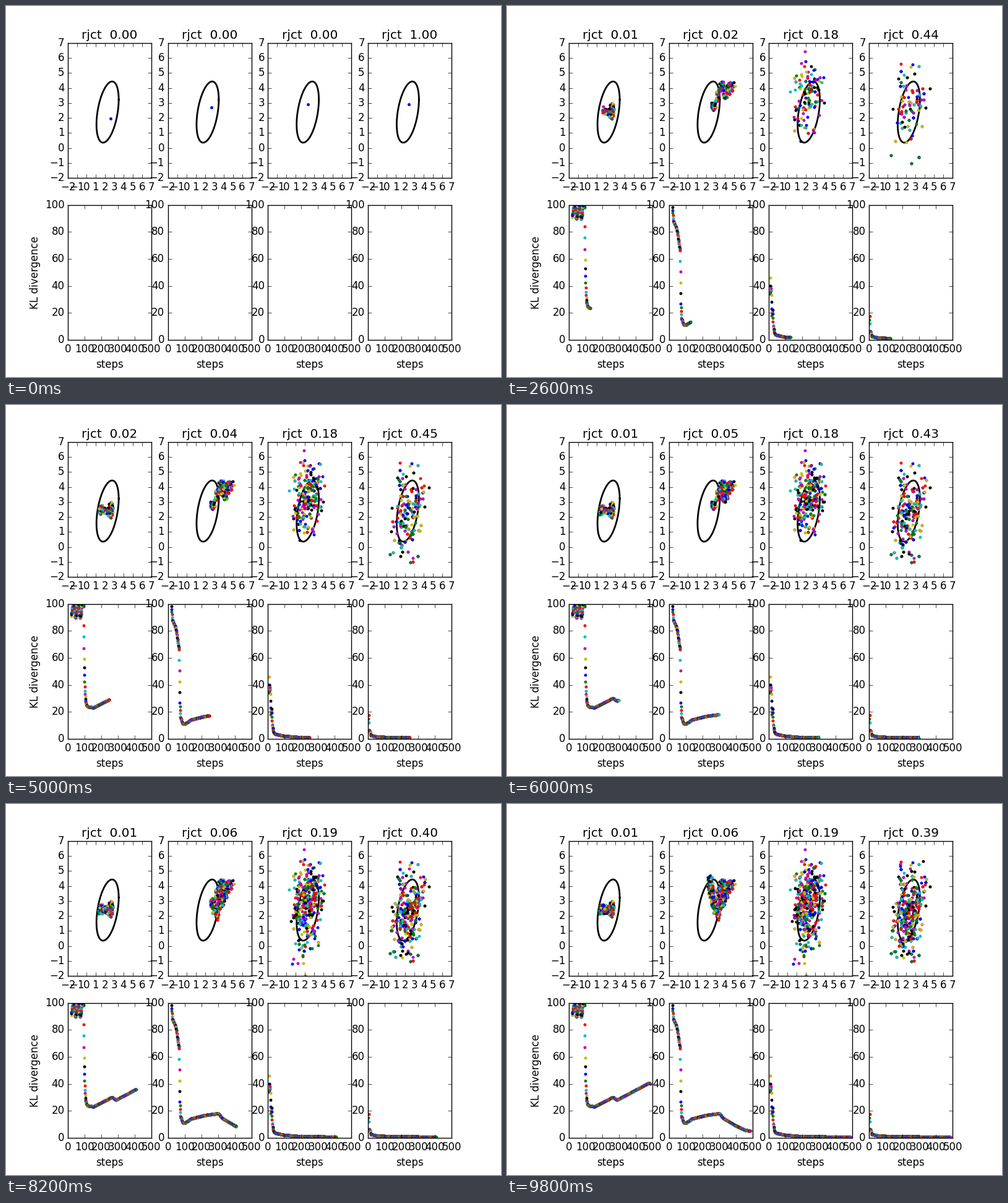
These frames come from a looping animation (800 px wide and 600 px high, 10 s). A matplotlib script:

```python
import numpy as np
import matplotlib.pyplot as plt
from matplotlib.animation import FuncAnimation

plt.style.use("classic")
plt.rcParams["font.family"] = "DejaVu Sans"

FRAMES, INTERVAL, PER_FRAME = 50, 200, 10
STEPS = (FRAMES - 1) * PER_FRAME + 1
HIDDEN = 200    # above the top of the divergence axes
PALETTE = np.array([(0, 0, 1), (0, .5, 0), (1, 0, 0), (0, .75, .75),
                    (.75, 0, .75), (.75, .75, 0), (0, 0, 0)])
n = np.arange(STEPS)


def rejections(*totals):
    """Running count of rejected proposals."""
    stages = [0, 80, 180, 250, 350, 410, 490]
    return np.floor(np.interp(n, stages, totals) + 1e-6).astype(int)


def walk(seed, spread, tilt, rejected, *route):
    """Scatter around a drifting centre, resting on every rejected step."""
    steps, x, y = np.transpose(route)
    rng = np.random.default_rng(seed)
    noise = np.clip(rng.normal(size=(STEPS, 2)), -2, 2)
    noise[0] = 0
    noise[:, 0] = tilt * noise[:, 1] + np.sqrt(1 - tilt ** 2) * noise[:, 0]
    points = np.column_stack([np.interp(n, steps, x), np.interp(n, steps, y)])
    points += noise * spread
    moved = np.diff(rejected, prepend=rejected[0]) == 0
    return points[np.maximum.accumulate(np.where(moved, n, 0))]


def curve(*knots):
    return np.interp(n, *np.transpose(knots), left=HIDDEN)


def slow_start():
    """A waving plateau, a steep fall and a slow climb."""
    plateau = 95.5 + 6 * np.cos(2 * np.pi * (n - 33) / 28.5)
    fall = 60 * np.exp(-(np.maximum(n - 96, 0) / 5.2) ** 1.15)
    climb = curve((96, 24), (155, 23), (265, 30), (290, 28), (345, 31.5),
                  (480, 40.5), (490, 40))
    return np.where(n < 22, HIDDEN, np.where(n < 96, plateau, climb + fall))


rejected = [rejections(0, 0, 2, 4, 5, 5, 6),
            rejections(0, 1, 5, 10, 20, 24, 29),
            rejections(0, 16, 33, 45, 66, 78, 93),
            rejections(1, 31, 85, 113, 144, 164, 191)]

paths = [
    walk(3, (.09, .13), 0, rejected[0],
         (0, 2.6, 1.95), (20, 2.68, 2.85), (40, 2.7, 2.25), (80, 2.65, 2.8),
         (93, 2.75, 2.4), (125, 1.65, 2.5), (300, 1.5, 2.4), (350, 2.5, 2.4),
         (490, 1.8, 2.45)),
    walk(5, (.13, .16), 0, rejected[1],
         (0, 2.7, 2.71), (25, 2.95, 2.9), (62, 3.75, 4.4), (80, 4, 3.4),
         (110, 4.9, 4.15), (140, 4.1, 4.1), (170, 4.3, 3.4), (240, 3.5, 3.8),
         (280, 4.2, 3.3), (350, 3.2, 2.4), (375, 3.35, 1.85),
         (410, 2.6, 3.1), (440, 2.4, 4.6), (490, 2.75, 3.2)),
    walk(8, (.75, .75), .2, rejected[2],
         (0, 2.31, 2.92), (25, 2.5, 2.8), (50, 2.5, 5), (80, 1.8, 4.2),
         (130, 1.9, 1.5), (180, 2.7, 4.4), (240, 2.3, 2.2), (290, 2.6, 3.8),
         (340, 1.9, -.5), (370, 2.3, 2), (420, 2.3, 4), (450, 2.1, 1),
         (490, 2.4, 3.8)),
    walk(13, (.85, 1.4), .3, rejected[3],
         (0, 2.39, 2.92), (15, 1.8, 3.4), (80, 2.8, 2.6), (130, 2.1, 1.7),
         (250, 2.1, 1.8), (350, 2.2, 2), (490, 2.6, 3)),
]

divergence = [
    slow_start(),
    curve((23, 98), (28, 88), (50, 81.5), (68, 66), (73, 26.5), (77, 16),
          (90, 11), (105, 11), (140, 14), (220, 16.5), (305, 18),
          (325, 14.5), (400, 9), (460, 5.5), (490, 5)),
    curve((8, 46), (10, 34), (14, 38), (18, 18), (23, 22), (27, 10.5),
          (33, 5.5), (40, 3.6), (90, 2.1), (180, 1.1), (490, .3)),
    curve((3, 12), (5, 17.5), (7, 6.5), (12, 5.5), (18, 2.4), (60, 1.3),
          (180, .8), (490, .5)),
]


def dots(ax, points, shift):
    """Scatter layer whose dots sit on whole pixels."""
    pixels = np.round(ax.transData.transform(points))
    points = ax.transData.inverted().transform(pixels)
    layer = ax.scatter([], [], s=9, linewidths=.5, zorder=2.1)
    return layer, points, PALETTE[(n - shift) % 7]


fig, axes = plt.subplots(2, 4, figsize=(8, 6), dpi=100, facecolor="white")
t = np.linspace(0, 2 * np.pi, 200)
layers = []
for top, bottom, path, kl in zip(*axes, paths, divergence):
    top.plot(2.285 + 1.2 * np.cos(t), 2.4 + 2.04 * np.sin(t + .42), "k", lw=2)
    top.set(xlim=(-2, 7), ylim=(-2, 7),
            xticks=range(-2, 8), yticks=range(-2, 8))
    bottom.set(xlim=(0, 500), ylim=(0, 100),
               xticks=range(0, 501, 100), yticks=range(0, 101, 20))
    bottom.set_xlabel("steps", labelpad=5.7)
    layers.append(dots(top, path, 0))
    layers.append(dots(bottom, np.column_stack([n, kl]), 3))
axes[1, 0].set_ylabel("KL divergence")


def draw(frame):
    count = frame * PER_FRAME + 1
    for layer, points, colors in layers:
        layer.set_offsets(points[:count])
        layer.set_facecolor(colors[:count])
        layer.set_edgecolor(colors[:count])
    for ax, total in zip(axes[0], rejected):
        ax.set_title(f"rjct  {total[count - 1] / count:.2f}")


anim = FuncAnimation(fig, draw, frames=FRAMES, interval=INTERVAL,
                     init_func=lambda: draw(0), repeat=True, repeat_delay=0)
plt.show()
```
